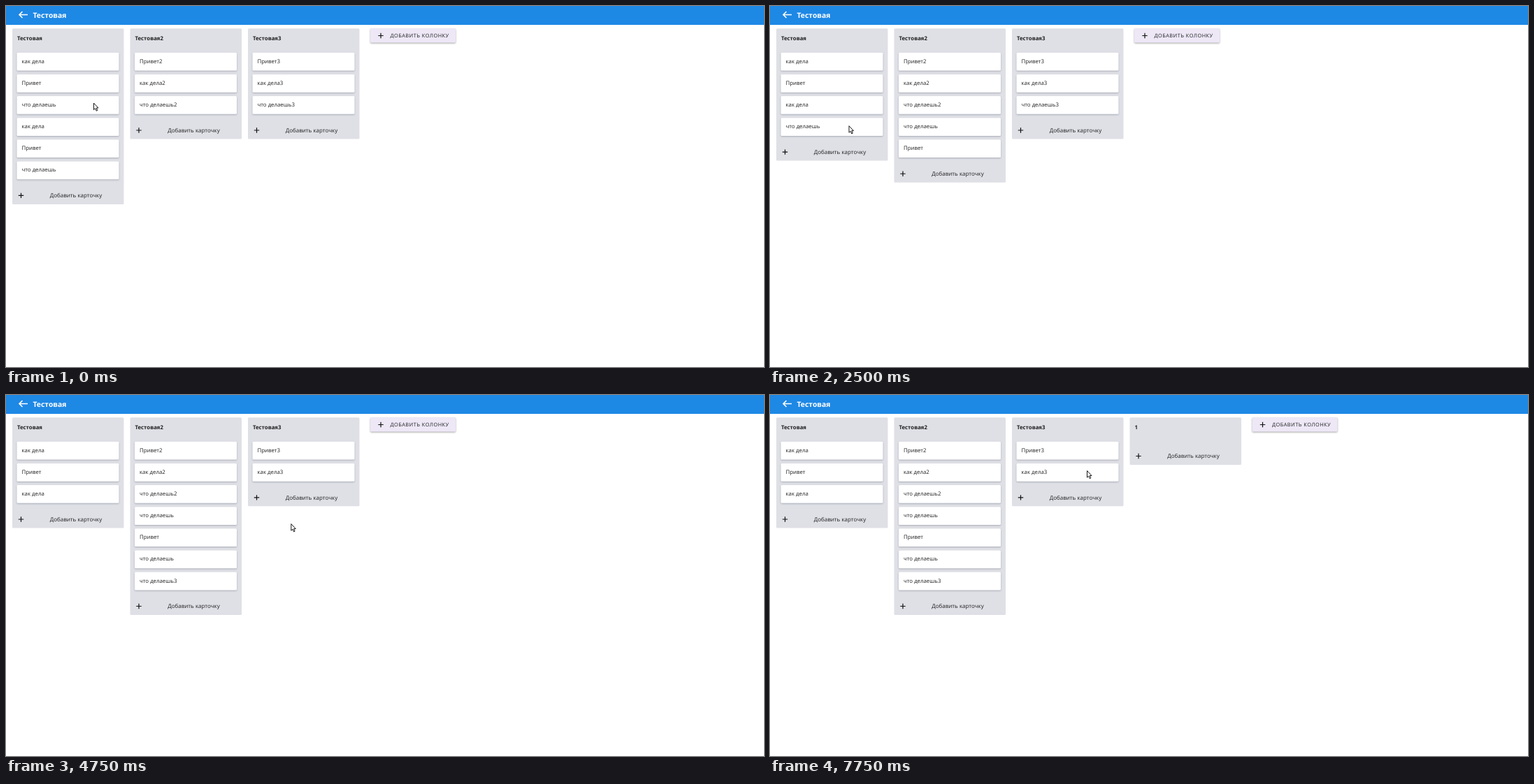
Write an HTML page that moves like this. It is 1084 by 517 pixels and loops after 8 s.

```html
<!DOCTYPE html>
<html lang="ru">
<head>
<meta charset="utf-8">
<title>Доска</title>
<style>
html, body { margin: 0; width: 100%; height: 100%; overflow: hidden; background: #fff; }
svg { display: block; width: 1084px; height: 517px; }
text { font: 7.85px "Open Sans", "Noto Sans", sans-serif; fill: #212121; text-rendering: geometricPrecision; }
.name { font-size: 7.8px; font-weight: 700; }
.title { font-size: 10.4px; font-weight: 700; fill: #fff; }
.foot { font-size: 8px; text-anchor: middle; }
.caps { font-size: 7.35px; letter-spacing: .5px; }
.card { fill: #fff; filter: drop-shadow(0 1px 1px rgba(40, 45, 70, .3)); }
.button { fill: #ede7f6; filter: drop-shadow(0 1px 1px rgba(0, 0, 0, .35)); }
.plus { stroke: #111; stroke-width: 1.2; }
</style>
</head>
<body>
<svg id="stage" viewBox="0 0 1084 517"></svg>
<script>
const STEP = 250, LOOP = 8000, NEW_COLUMN = 27;
const COL_X = 9, COL_GAP = 168.5, COL_W = 159.5, TOP = 66.8, ROW = 31.13;
const stage = document.getElementById('stage');

const words = ['Привет', 'как дела', 'что делаешь'];
const greeting = ['как дела', 'Привет', 'что делаешь'];
const board = [
  { name: 'Тестовая', cards: [...greeting, ...greeting] },
  ...[2, 3].map(n => ({ name: 'Тестовая' + n, cards: words.map(w => w + n) }))
];

// Drags into the second column; lift and release are in steps, hold is the pointer's place on the card
const moves = [
  { from: 0, row: 2, lift: 1, release: 4, drop: [173, 158], hold: [82, 15] },
  { from: 0, row: 3, lift: 6, release: 8, drop: [152, 193], hold: [98, 10.5] },
  { from: 0, row: 3, lift: 10, release: 12, drop: [168, 215], hold: [97, 11] },
  { from: 2, row: 2, lift: 15, release: 17, drop: [290, 235.5], hold: [9.5, 41] }
];

// Resting places of the pointer between and after the drags
const rests = [
  { s: 0, at: [125, 138.5] }, { s: 13, at: [371, 167.5] },
  { s: 22, at: [569, 45.5] }, { s: 26, at: [572, 47] }, { s: 31, at: [453, 108] }
];

const mix = (a, b, f) => a.map((v, i) => v + (b[i] - v) * f);
const slot = (col, row) => [COL_X + 6.5 + col * COL_GAP, TOP + row * ROW];

function cardAt(m, s) {
  const f = (s - m.lift) / (m.release - m.lift);
  return mix(slot(m.from, m.row), m.drop, Math.sin(f * Math.PI / 2));
}

const grip = (m, s) => cardAt(m, s).map((v, i) => v + m.hold[i]);
const keys = [...rests, ...moves.flatMap(m => [m.lift, m.release].map(s => ({ s, at: grip(m, s) })))]
  .sort((a, b) => a.s - b.s);

function pointerAt(s) {
  const m = moves.find(m => s >= m.lift && s <= m.release);
  if (m) return grip(m, s);
  const i = Math.max(1, keys.findIndex(k => k.s >= s));
  const a = keys[i - 1], b = keys[i];
  return mix(a.at, b.at, (s - a.s) / (b.s - a.s));
}

const rect = (x, y, w, h, attrs) => `<rect x="${x}" y="${y}" width="${w}" height="${h}" ${attrs}/>`;
const label = (x, y, s, cls = '') => `<text x="${x}" y="${y}" class="${cls}">${s}</text>`;
const plus = (x, y) => `<path class="plus" d="M${x - 3.7} ${y}h7.4M${x} ${y - 3.7}v7.4"/>`;
const card = ([x, y], s) => rect(x, y, 146, 25.8, 'rx="1.5" class="card"') + label(x + 7, y + 15, s);

function column(col, i, [px, py], free) {
  const x = COL_X + i * COL_GAP, last = col.cards.length - 1;
  const bottom = (col.slots ? 97.1 + col.slots * ROW : 100) - col.squeeze;
  const hover = free && px > x && px < x + COL_W && py > bottom - 25.5 && py < bottom;
  const place = r => mix(slot(i, r), [0, 0], 0).map((v, k) => k && r === last ? v - col.squeeze : v);
  return rect(x, 32.3, COL_W, bottom - 32.3, 'rx="1.5" fill="#dfe0e6"') +
    (hover ? rect(x, bottom - 25.5, COL_W, 25.5, 'fill="#d1d3da"') : '') +
    label(x + 7, 48.5, col.name, 'name') +
    col.cards.map((s, r) => card(place(r), s)).join('') +
    plus(x + 12.5, bottom - 12.5) +
    label(x + 91, bottom - 9.7, 'Добавить карточку', 'foot');
}

function draw(s) {
  const cols = board.map(c => ({ name: c.name, cards: [...c.cards], slots: c.cards.length, squeeze: 0 }));
  let floating = '';
  for (const m of moves) {
    if (s < m.lift) break;
    const from = cols[m.from], to = cols[1];
    const [text] = from.cards.splice(m.row, 1);
    if (s >= m.release) to.slots++;
    if (s > m.release) to.cards.push(text);
    else floating = card(cardAt(m, s), text);
    // The new card sinks its last pixels before the old gap closes
    if (s === m.release + 1) to.squeeze = 3;
    if (s > m.release + 1) from.slots--;
  }
  if (s >= NEW_COLUMN) cols.push({ name: '1', cards: [], slots: 0, squeeze: 0 });

  const p = pointerAt(s), bx = 521 + (cols.length - 3) * COL_GAP;
  stage.innerHTML =
    rect(0, 0, 1084, 27, 'fill="#1e88e5"') +
    '<path d="M31 12.5H19M23.5 8L19 12.5L23.5 17" fill="none" stroke="#fff" stroke-width="1.6"/>' +
    label(38.5, 17, 'Тестовая', 'title') +
    cols.map((c, i) => column(c, i, p, !floating)).join('') +
    rect(bx, 32, 122, 20.5, 'rx="1.5" class="button"') +
    plus(bx + 15, 42.5) + label(bx + 28.5, 45.2, 'ДОБАВИТЬ КОЛОНКУ', 'caps') +
    floating +
    `<path transform="translate(${p})" d="M.5 .5V10.1L2.7 8.1L4.2 11.7L5.8 11L4.3 7.5H7Z" fill="#fff" stroke="#000" stroke-width=".9"/>`;
}

let shown = -1;
function tick() {
  const s = Math.floor(performance.now() % LOOP / STEP);
  if (s !== shown) draw(shown = s);
  requestAnimationFrame(tick);
}
tick();
</script>
</body>
</html>
```
